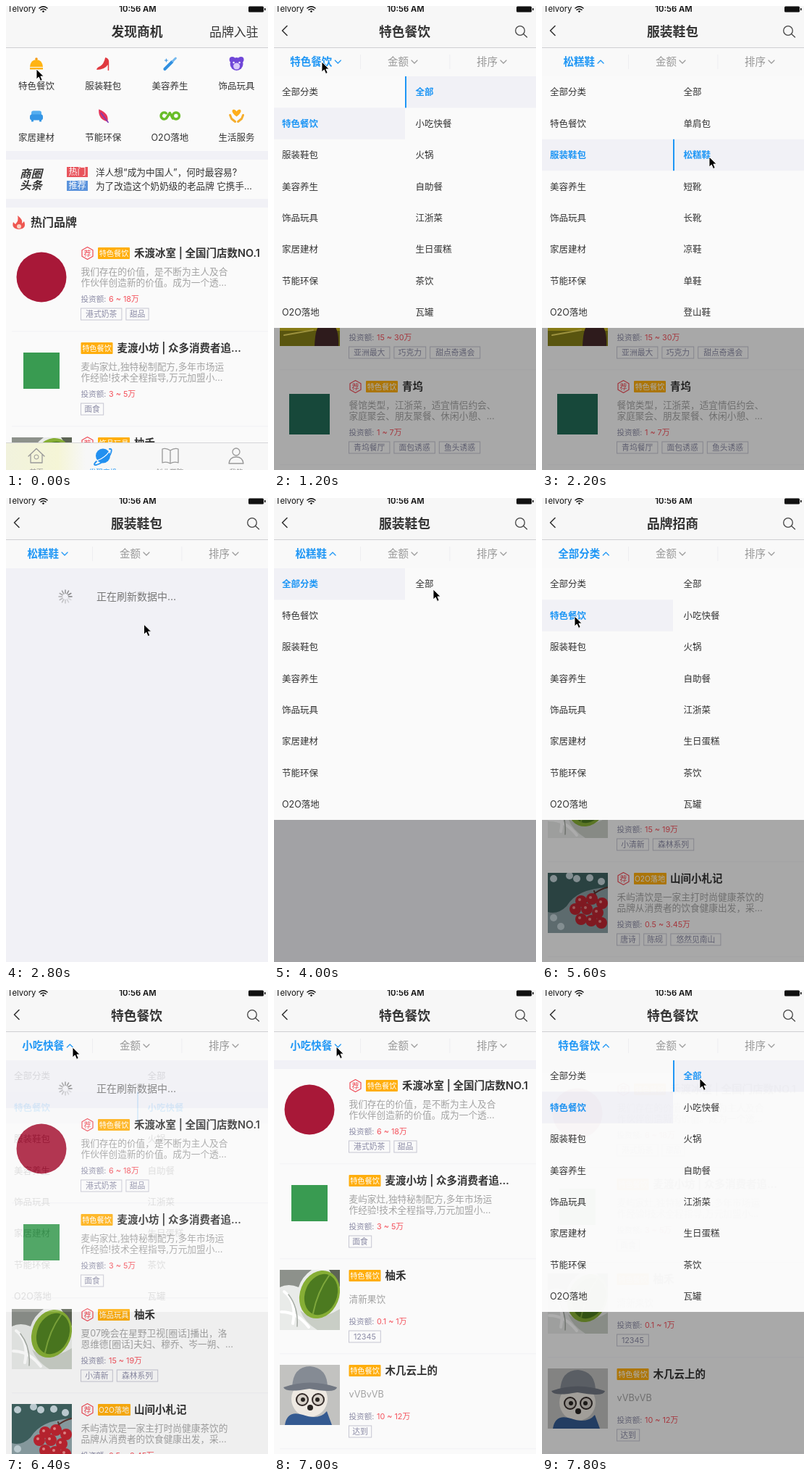
An HTML page that plays this animation: 362 px wide and 640 px high, repeating every 8000 ms.

```html
<!DOCTYPE html>
<html lang="zh-CN">
<head>
<meta charset="utf-8">
<title>发现商机</title>
<style>
html, body { margin: 0; width: 100%; height: 100%; overflow: hidden; background: #fafafa; }
svg { display: block; width: 100vw; height: 100vh; font-family: Inter, "Noto Sans CJK SC", "Noto Sans CJK", sans-serif; }
</style>
</head>
<body>
<svg id="stage" viewBox="0 0 362 640"></svg>
<script>
const STEP = 200, STEPS = 40;
const BLUE = '#1e96f5', INK = '#333', PAPER = '#fafafa', BAND = '#f1f1f6';

// Drawing helpers
const text = (s, x, cy, size, fill = INK, attrs = '') =>
  `<text x="${x}" y="${cy + size * .37}" font-size="${size}" fill="${fill}" ${attrs}>${s}</text>`;
const mid = (s, x, cy, size, fill, attrs = '') => text(s, x, cy, size, fill, `text-anchor="middle" ${attrs}`);
const rect = (x, y, w, h, fill, attrs = '') =>
  `<rect x="${x}" y="${y}" width="${w}" height="${h}" fill="${fill}" ${attrs}/>`;
const dot = (x, y, r, fill, attrs = '') => `<circle cx="${x}" cy="${y}" r="${r}" fill="${fill}" ${attrs}/>`;
const fill = (d, color) => `<path d="${d}" fill="${color}"/>`;
const line = (d, color, width = 1) =>
  `<path d="${d}" fill="none" stroke="${color}" stroke-width="${width}" stroke-linecap="round" stroke-linejoin="round"/>`;
const at = (x, y, body, attrs = '') => `<g transform="translate(${x} ${y})" ${attrs}>${body}</g>`;
const BOLD = 'font-weight="600"';

// Row pictures, 83 x 83
const lime = rect(0, 0, 83, 83, '#e9ebe9') + fill('M0 0H44Q30 10 26 24Q12 18 0 24Z', '#8d918b')
  + fill('M68 0H83V24Z', '#5c6454') + fill('M28 56Q50 74 83 54V83H52Q34 72 28 56Z', '#c9cec6')
  + `<ellipse cx="55" cy="34" rx="27" ry="34" fill="#86ae35" transform="rotate(22 55 34)"/>`
  + `<ellipse cx="57" cy="34" rx="22" ry="29" fill="#4c7a20" transform="rotate(22 57 34)"/>`
  + line('M68 8Q52 30 46 60', '#7fa83c', 2)
  + line('M6 30Q24 44 18 74M2 58Q24 58 40 79', '#fff', 4) + line('M12 34Q26 52 24 78', '#a5aba4', 1.5);
const berries = rect(0, 0, 83, 83, '#8b9fa4') + fill('M0 0H83V20Q40 22 26 46Q14 58 0 54Z', '#3f6260')
  + [[8, 8], [30, 4], [40, 8], [58, 7], [74, 12], [8, 62], [18, 74]].map(([x, y]) => dot(x, y, 5, '#c3d3d8')).join('')
  + line('M83 20Q64 24 50 44M64 25L72 50', '#59352f', 2)
  + [[46, 39], [61, 36], [75, 42], [38, 50], [54, 50], [69, 55], [46, 64], [74, 69], [60, 66]]
    .map(([x, y]) => dot(x, y, 8, '#bd2531') + dot(x - 2, y - 2, 2, '#e58a8a')).join('');
const stagePhoto = rect(0, 0, 83, 83, '#c8b51f') + rect(0, 62, 83, 21, '#857f16')
  + fill('M48 83Q49 54 58 52Q53 34 64 33Q76 34 71 52Q82 56 81 83Z', '#44282a') + line('M6 68L46 61', '#e8d85c', 2);
const dog = rect(0, 0, 83, 83, '#c2c2c0') + dot(41, 47, 25, '#eee9e2')
  + fill('M17 32Q18 2 42 2Q66 4 66 32Z', '#858b94') + fill('M5 31Q41 18 79 31Q78 40 41 33Q8 39 5 31Z', '#717782')
  + dot(31, 48, 8, '#d8d2ca', 'stroke="#332a28" stroke-width="2"') + dot(53, 48, 8, '#d8d2ca', 'stroke="#332a28" stroke-width="2"')
  + dot(32, 48, 3, '#292522') + dot(52, 48, 3, '#292522') + dot(42, 59, 4, '#292522')
  + fill('M7 83Q10 62 32 69Q54 77 65 64L72 83Z', '#345a91');
const redMark = dot(41, 41, 34.5, '#a81838');
const greenMark = rect(16, 14, 50, 50, '#399b51');
const tealMark = rect(13, 18, 56, 56, '#226b56');

const row = (pic, rec, badge, title, lines, amount, tags) => ({ pic, rec, badge, title, lines, amount, tags });
const ice = row(redMark, 1, '特色餐饮', '禾渡冰室 | 全国门店数NO.1',
  ['我们存在的价值，是不断为主人及合', '作伙伴创造新的价值。成为一个透…'], '6 ~ 18万', ['港式奶茶', '甜品']);
const noodle = row(greenMark, 0, '特色餐饮', '麦渡小坊 | 众多消费者追…',
  ['麦屿家灶,独特秘制配方,多年市场运', '作经验!技术全程指导,万元加盟小…'], '3 ~ 5万', ['面食']);
const citrus = row(lime, 1, '饰品玩具', '柚禾',
  ['夏07晚会在星野卫视[圈话]播出，洛', '恩维德[圈话]夫妇、穆乔、岑一朔、…'], '15 ~ 19万', ['小清新', '森林系列']);
const poem = row(berries, 1, 'O2O落地', '山间小札记',
  ['禾屿清饮是一家主打时尚健康茶饮的', '品牌从消费者的饮食健康出发，采…'], '0.5 ~ 3.45万', ['唐诗', '陈砚', '悠然见南山']);
const sweets = row(stagePhoto, 1, '特色餐饮', '栗屿',
  ['精选原料，手工制作，适合全家分享', '的甜蜜滋味，总部全程扶持开店…'], '15 ~ 30万', ['亚洲最大', '巧克力', '甜点奇遇会']);
const tea = row(tealMark, 1, '特色餐饮', '青坞',
  ['餐馆类型，江浙菜，适宜情侣约会、', '家庭聚会、朋友聚餐、休闲小憩、…'], '1 ~ 7万', ['青坞餐厅', '面包诱惑', '鱼头诱惑']);
const trial = row(lime, 0, '特色餐饮', '柚禾', ['清新果饮'], '0.1 ~ 1万', ['12345']);
const hat = row(dog, 0, '特色餐饮', '木几云上的', ['vVBvVB'], '10 ~ 12万', ['达到']);
const LISTS = {
  food: [ice, noodle, sweets, tea], all: [ice, noodle, citrus, poem],
  snack: [ice, noodle, trial, hat], none: []
};

function drawRow(r, y) {
  const bx = r.rec ? 127 : 103.5;
  let out = at(8, y - 8, `<svg width="83" height="83">${r.pic}</svg>`);
  if (r.rec) out += line(`M112.5 ${y - 8.5}l7.5 4.2v8.5l-7.5 4.2l-7.5 -4.2v-8.5z`, '#ef4a55', 1.2) + mid('荐', 112.5, y, 10, '#ef4a55');
  out += rect(bx, y - 8, r.badge[0] === 'O' ? 45 : 44, 16, '#ffae0c', 'rx="1"') + mid(r.badge, bx + 22, y, 10.2, '#fff')
    + text(r.title, bx + 50, y, 14.5, INK, BOLD);
  r.lines.forEach((s, i) => out += text(s, 103.5, y + (r.lines.length > 1 ? 25.5 + i * 15.2 : 32), 12.7, '#a3a3a3'));
  out += text('投资额:', 103.5, y + 63.5, 10.6, '#8c8ca6') + text(r.amount, 142, y + 63.5, 10.8, '#f4525c');
  let x = 103.5;
  for (const tag of r.tags) {
    const w = (/\d/.test(tag) ? tag.length * .6 : tag.length) * 12.6 + 6;
    out += rect(x, y + 76, w, 16, 'none', 'stroke="#c6c6d2"') + mid(tag, x + w / 2, y + 84, 10.8, '#8c8ca6');
    x += w + 6;
  }
  return out;
}
const drawRows = (rows, dy) => rows.map((r, i) =>
  drawRow(r, 132 + dy + i * 131) + rect(8, 239.5 + dy + i * 131, 354, .8, '#f0f0f3')).join('');

// Home page
const ICONS = [
  ['特色餐饮', fill('M-9 4Q-8 -6 0 -6Q8 -6 9 4Z', '#ffb414') + dot(0, -7, 1.8, '#f59a16') + rect(-9, 5, 18, 2.5, '#ffb414')],
  ['服装鞋包', fill('M3 -9Q8 -8 8 -3V9H6.500V1Q2 8 -9 8Q-9 5 -4 3Q1 0 3 -9Z', '#e0393f')],
  ['美容养生', line('M-7 7L3 -3', '#2f8fe0', 4) + line('M4 -4L8 -8', '#75b9ee', 3) + line('M-5 -7v4M-7 -5h4', '#2f8fe0')],
  ['饰品玩具', dot(-6, -6, 4, '#7047d8') + dot(6, -6, 4, '#7047d8') + dot(0, 0, 9, '#7047d8') + dot(0, 3, 4.5, '#d9c8fa') + dot(-4, -2, 1.2, '#fff') + dot(4, -2, 1.2, '#fff')],
  ['家居建材', rect(-7, -7, 14, 9, '#55aef0', 'rx="3"') + rect(-9, -2, 18, 8, '#3596e5', 'rx="3"') + rect(-7, 5, 3, 3, '#3596e5') + rect(4, 5, 3, 3, '#3596e5')],
  ['节能环保', fill('M-6 -9Q9 -3 6 8Q-7 5 -6 -9Z', '#e5355b') + line('M-3 -4L7 9', '#7c38b5', 1.5)],
  ['O2O落地', line('M-5 -3.500A4.500 4.500 0 1 0 -5 3.500L0 -4L4 3.500', '#69bd28', 3.5) + dot(8.5, 0, 4.5, 'none', 'stroke="#69bd28" stroke-width="3.5"')],
  ['生活服务', fill('M0 1C-12 -8 -3 -12 0 -6C3 -12 12 -8 0 1Z', '#ffae1b') + line('M-9 -1L-7 4L-2 8M9 -1L7 4L2 8', '#f5ad2c', 3)]
];
const NAV = rect(0, 0, 362, 57, '#f7f7f7') + rect(0, 57, 362, 1, '#cfcfd2');
const TABBAR = rect(0, 602, 362, 38, '#f7f7f7') + rect(0, 602, 110, 38, 'url(#glow)') + rect(0, 602, 362, .8, '#cfcfd2')
  + line('M31 621L42 610.5L53 621M34 619V630H50V619', '#999', 1.3) + dot(42, 622, 3, 'none', 'stroke="#999"')
  + dot(134, 620.5, 10, '#2290f0') + line('M125 628Q119 634 125 633Q135 630 144 619Q148 610 143 611', '#2290f0', 1.8)
  + line('M126 627Q137 623 143 614', '#fff', 1.3)
  + line('M227 613Q221 609 216 611V630Q222 628 227 631Q232 628 238 630V611Q233 609 227 613V631', '#999', 1.3)
  + dot(318, 615, 5, 'none', 'stroke="#999" stroke-width="1.3"') + line('M308 631Q309 622 318 622Q327 622 328 631Z', '#999', 1.3)
  + ['首页', '发现商机', '创业学院', '我的'].map((s, i) => mid(s, 42 + i * 92, 642, 9.6, i === 1 ? BLUE : '#999')).join('');
const HOME = rect(0, 0, 362, 640, PAPER) + NAV + mid('发现商机', 181, 35.5, 17.8, INK, BOLD) + text('品牌入驻', 281, 35.5, 16.9)
  + ICONS.map(([label, icon], i) => {
      const x = 42 + (i % 4) * 92.2, y = 80 + (i > 3) * 71.5;
      return at(x, y, icon) + mid(label, x, y + 30, 12.5);
    }).join('')
  + rect(0, 200, 362, 12, BAND) + rect(0, 266, 362, 12, BAND)
  + ['商圈', '头条'].map((s, i) => text(s, 19, 231 + i * 16, 15.5, INK, 'font-weight="800" font-style="italic"')).join('')
  + rect(84, 222, 29, 14, '#e8545c') + mid('热门', 98.5, 229, 12, '#fff')
  + rect(84, 241, 29, 14, '#5b93dc') + mid('推荐', 98.5, 248, 12, '#fff')
  + text('洋人想“成为中国人”，何时最容易?', 124, 229, 12.7) + text('为了改造这个奶奶级的老品牌 它携手…', 124, 248, 12.6)
  + fill('M16 289Q24 295 22 300L25 297Q29 307 18 308Q7 307 10 298L13 301Q18 296 16 289Z', '#ee5650') + dot(18, 304, 3, '#fbd2c4')
  + text('热门品牌', 34, 298.5, 16, INK, BOLD)
  + drawRows([ice, noodle, citrus], 209) + TABBAR;

// Category page
const LEFT = ['全部分类', '特色餐饮', '服装鞋包', '美容养生', '饰品玩具', '家居建材', '节能环保', 'O2O落地'];
const RIGHT = [
  ['全部'],
  ['全部', '小吃快餐', '火锅', '自助餐', '江浙菜', '生日蛋糕', '茶饮', '瓦罐'],
  ['全部', '单肩包', '松糕鞋', '短靴', '长靴', '凉鞋', '单鞋', '登山鞋']
];
const ROW_H = 43.4;
const column = (items, selected, x, tx) => items.map((s, i) => {
  const y = 97 + i * ROW_H, on = i === selected;
  return (on ? rect(x, y, 181, ROW_H, BAND) + (x ? rect(x, y, 2, ROW_H, BLUE) : '') : '')
    + text(s, tx, y + 21.7, 12.5, on ? BLUE : INK, on ? BOLD : '');
}).join('');
const menu = s => `<g opacity="${s.menu}">` + rect(0, 97, 362, 543, '#000', 'opacity=".33"') + rect(0, 97, 362, 347, PAPER)
  + column(LEFT, s.left, 0, 11) + column(RIGHT[s.left], s.right, 181, 195.5) + '</g>';

const arrow = (x, up, color) => line(up ? `M${x - 4} 79l4 -4l4 4` : `M${x - 4} 75l4 4l4 -4`, color, 1.2);
const tab = (s, x, color, up, attrs) => mid(s, x, 77, 14.5, color, attrs) + arrow(x + s.length * 7.25 + 8, up, color);
const spinner = n => Array.from({ length: 12 }, (_, i) =>
  `<path d="M0 -4.5V-9" stroke="#777" stroke-width="1.6" stroke-linecap="round" opacity="${.2 + ((i - n * 2 + 96) % 12) / 15}" transform="rotate(${i * 30})"/>`).join('');

function listPage(s, n) {
  const rows = LISTS[s.list];
  return rect(0, 0, 362, 640, BAND)
    + (s.off ? at(82, 136, spinner(n)) + text('正在刷新数据中…', 125, 136, 14, '#777') : '')
    + (rows.length ? rect(0, 109 + s.off, 362, 540, PAPER) : '') + drawRows(rows, s.off)
    + (s.menu ? menu(s) : '')
    + NAV + rect(0, 58, 362, 39, '#f9f9f9') + rect(119, 67, .8, 20, '#ececef') + rect(242.5, 67, .8, 20, '#ececef')
    + line('M18 27.5L11.5 34L18 40.5', INK, 1.6) + mid(s.title, 180.5, 35.5, 17.8, INK, BOLD)
    + dot(340, 34, 6.3, 'none', 'stroke="#444" stroke-width="1.3"') + line('M344.8 38.8L349.5 43', '#444', 1.3)
    + tab(s.tab, 51.3, BLUE, s.up, BOLD) + tab('金额', 171.5, '#999') + tab('排序', 294.5, '#999');
}

const STATUS = text('Telvory', 2, 4, 11.3, '#111') + mid('10:56 AM', 182, 4, 11.3, '#111', BOLD)
  + line('M46 3Q51.5 -1.5 57 3M48 5.3Q51.5 2.5 55 5.3', '#111', 1.5) + dot(51.5, 7.5, 1.3, '#111')
  + rect(335, .5, 21, 8, '#111', 'rx="1.5"') + rect(357, 3, 1.6, 3, '#111');
const POINTER = `<path d="M0 0V14L3.3 11L5.6 16.4L8.2 15.3L5.9 10H10.2Z" fill="#000" stroke="#fff" stroke-width=".9"/>`;
const DEFS = `<defs><linearGradient id="glow"><stop stop-color="#f1f2dd"/><stop offset=".65" stop-color="#f5f5d6"/><stop offset="1" stop-color="#f7f7f7"/></linearGradient></defs>`;

// Timeline: [step, changed properties]
const CHANGES = [
  [0, { push: 0, list: 'food', title: '特色餐饮', tab: '特色餐饮', left: 1, right: 0, menu: 0, up: 0, off: 54 }],
  [2, { push: .5 }], [3, { push: 1 }], [4, { off: 0 }], [6, { menu: 1 }], [7, { up: 1 }],
  [8, { left: 2, right: -1 }], [11, { right: 2, title: '服装鞋包', tab: '松糕鞋' }],
  [12, { menu: .6, off: 54 }], [13, { menu: .13 }], [14, { menu: 0, up: 0, list: 'none' }], [15, { off: 0 }],
  [17, { menu: 1 }], [18, { up: 1, left: 0, right: -1 }],
  [21, { right: 0, title: '品牌招商', tab: '全部分类', menu: .6, off: 54 }], [22, { menu: .13, list: 'all' }],
  [23, { menu: 0, up: 0, off: 20 }], [24, { off: 0 }], [25, { menu: 1 }], [26, { up: 1 }],
  [28, { left: 1, right: -1 }], [30, { right: 1, title: '特色餐饮', tab: '小吃快餐', menu: .98, off: 5 }],
  [31, { menu: .6, off: 54 }], [32, { menu: .13 }], [33, { menu: 0, up: 0 }], [34, { list: 'snack', off: 0 }],
  [36, { menu: 1 }], [37, { up: 1 }], [39, { right: 0, tab: '特色餐饮', menu: .98, off: 5 }]
];
const PATH = [[0, 42, 87], [3, 42, 87], [5, 66, 77], [6, 66, 77], [8, 50, 205], [11, 231, 208], [13, 231, 208],
  [16, 75, 78], [17, 75, 78], [18, 45, 120], [20, 220, 126], [21, 220, 126], [24, 70, 79], [25, 70, 79],
  [27, 45, 163], [28, 45, 163], [30, 215, 163], [32, 92, 79], [36, 85, 78], [38, 218, 122], [40, 218, 122]];

function pointerAt(n) {
  const i = PATH.findIndex(p => p[0] > n), [a, x0, y0] = PATH[i - 1], [b, x1, y1] = PATH[i];
  const k = (n - a) / (b - a), e = k * k * (3 - 2 * k);
  return at(x0 + (x1 - x0) * e, y0 + (y1 - y0) * e, POINTER);
}

function scene(n) {
  const s = Object.assign({}, ...CHANGES.filter(c => c[0] <= n).map(c => c[1]));
  return DEFS + (s.push < 1 ? at(-108 * s.push, 0, HOME) : '')
    + (s.push > 0 ? at(362 * (1 - s.push), 0, listPage(s, n)) : '')
    + STATUS + pointerAt(n);
}

const stage = document.getElementById('stage');
const start = performance.now();
let shown = -1;
function tick() {
  const n = Math.floor((performance.now() - start) / STEP) % STEPS;
  if (n !== shown) stage.innerHTML = scene(shown = n);
  requestAnimationFrame(tick);
}
tick();
</script>
</body>
</html>
```
